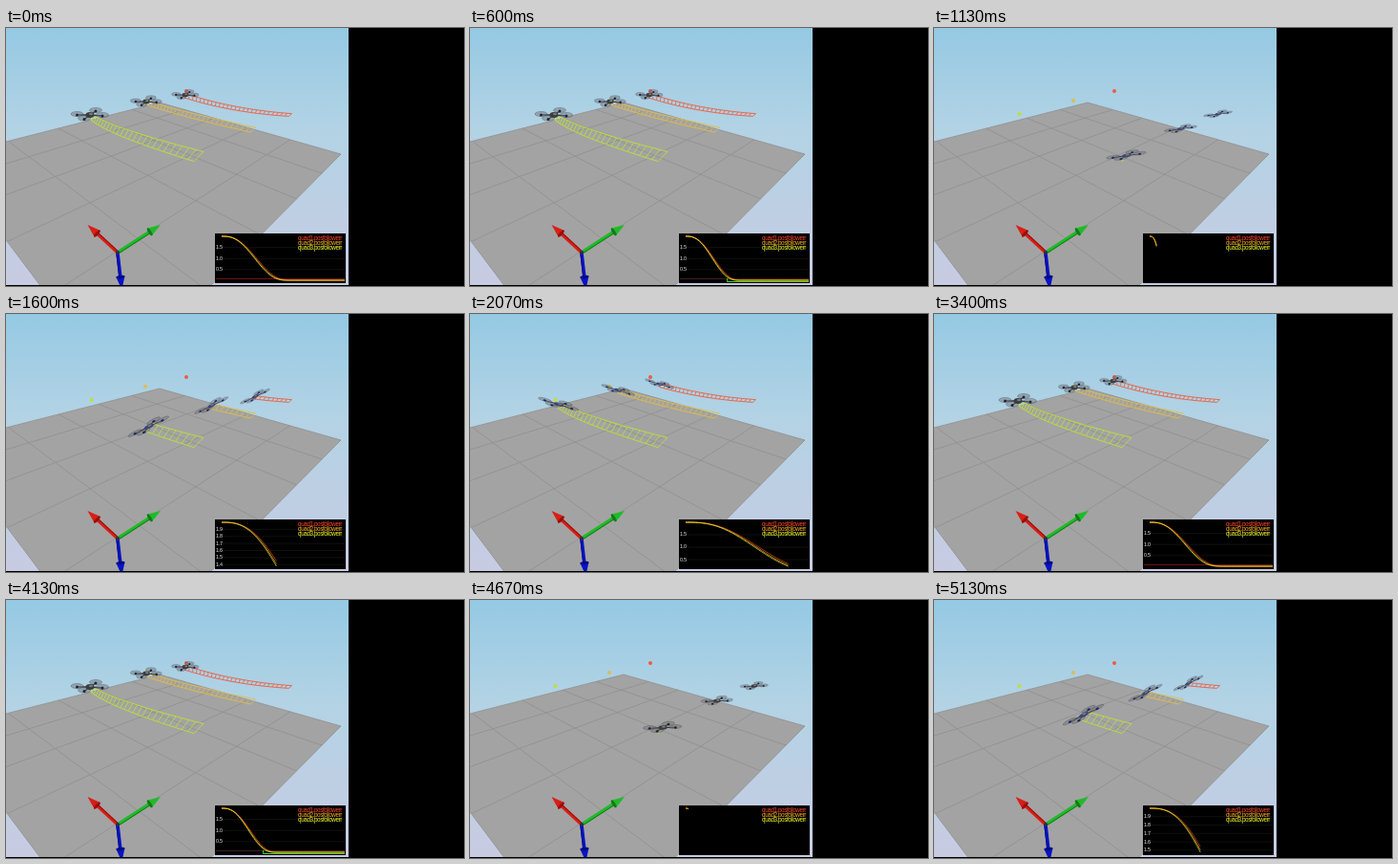
An HTML page with a canvas for the animation above (5.19 s loop, 480 by 270 pixels).

```html
<!DOCTYPE html>
<html>
<head>
<meta charset="utf-8">
<style>
html, body { margin: 0; width: 100%; height: 100%; overflow: hidden; background: #000; }
canvas { display: block; }
</style>
</head>
<body>
<canvas id="stage" width="480" height="270"></canvas>
<script>
const ctx = document.getElementById('stage').getContext('2d');
const LOOP = 5190, STEP = 200 / 3;      // playback length and frame step, ms
const FLIGHT = 3573, OFFSET = 2507;     // one flight cycle and its phase at time 0
const MOVE = 1340, WINDOW = 1200;       // travel time, smallest plot window

// path: start, control, end; half: ribbon half-width at start and end
const quads = [
  { path: [[298, 90], [238, 86], [188, 70]], half: [[1.5, -1.4], [.3, -2.3]], size: 14.5,
    dot: [189, 66], trail: '#ef5c3c', line: '#f8482c', lag: 1.06 },
  { path: [[259, 105.5], [184, 89.5], [147, 77]], half: [[2.5, -2.6], [.6, -2]], size: 16.5,
    dot: [146, 76], trail: '#dfbd4c', line: '#ffae20', lag: 1.025 },
  { path: [[202, 133.5], [107, 107], [88, 91]], half: [[5, -5.2], [1, -2.5]], size: 20,
    dot: [89.5, 90], trail: '#bfdf38', line: '#f0ff30', lag: 1 }
];
const tilts = [[0, 0], [200, -27], [560, -27], [760, 0], [950, 18], [1250, 6], [1530, -5], [1900, 0]];

const mix = (a, b, k) => a + (b - a) * k;

function ease(p) {
  p = Math.min(1, Math.max(0, p));
  return p * p * p * (10 - 15 * p + 6 * p * p);
}

function tiltAt(u) {
  const i = tilts.findIndex(k => k[0] > u);
  if (i < 1) return 0;
  const [a, x] = tilts[i - 1], [b, y] = tilts[i];
  return mix(x, y, (u - a) / (b - a));
}

function along(path, e) {
  return [0, 1].map(i => mix(mix(path[0][i], path[1][i], e), mix(path[1][i], path[2][i], e), e));
}

function poly(points, fill) {
  ctx.beginPath();
  points.forEach(p => ctx.lineTo(p[0], p[1]));
  ctx.closePath();
  ctx.fillStyle = fill;
  ctx.fill();
}

function stroke(points, color, width) {
  ctx.beginPath();
  points.forEach(p => ctx.lineTo(p[0], p[1]));
  ctx.strokeStyle = color;
  ctx.lineWidth = width;
  ctx.stroke();
}

function ellipse(x, y, rx, ry, fill, edge) {
  ctx.beginPath();
  ctx.ellipse(x, y, rx, ry, 0, 0, 7);
  ctx.fillStyle = fill;
  ctx.fill();
  if (edge) {
    ctx.strokeStyle = edge;
    ctx.lineWidth = .7;
    ctx.stroke();
  }
}

// perspective map of the unit square onto corners a, b, c, d
function projector([a, b, c, d]) {
  const sx = a[0] - b[0] + c[0] - d[0], sy = a[1] - b[1] + c[1] - d[1];
  const x1 = b[0] - c[0], y1 = b[1] - c[1], x2 = d[0] - c[0], y2 = d[1] - c[1];
  const det = x1 * y2 - x2 * y1;
  const g = (sx * y2 - x2 * sy) / det, h = (x1 * sy - sx * y1) / det;
  return (u, v) => [0, 1].map(i =>
    ((b[i] - a[i] + g * b[i]) * u + (d[i] - a[i] + h * d[i]) * v + a[i]) / (g * u + h * v + 1));
}

function drawWorld() {
  const sky = ctx.createLinearGradient(0, 0, 0, 270);
  sky.addColorStop(0, '#95c9e3');
  sky.addColorStop(.4, '#b3d3e5');
  sky.addColorStop(1, '#c8cbe2');
  ctx.fillStyle = sky;
  ctx.fillRect(0, 0, 360, 270);

  const corners = [[161, 78], [351, 132], [113, 372], [-65, 135.5]];
  const at = projector(corners);
  poly(corners, '#a3a3a3');
  for (let i = 0; i <= 5; i++) {
    const k = i / 5;
    stroke([at(k, 0), at(k, 1)], '#909090', .8);
    stroke([at(0, k), at(1, k)], '#909090', .8);
  }
}

function arrow(x, y, color, shade) {
  const ox = 117, oy = 235, len = Math.hypot(x - ox, y - oy);
  ctx.save();
  ctx.translate(ox, oy);
  ctx.rotate(Math.atan2(y - oy, x - ox));
  stroke([[0, 0], [len - 13, 0]], color, 3.4);
  stroke([[0, 1.3], [len - 13, 1.3]], shade, 1);
  poly([[len - 14, -4.6], [len, 0], [len - 14, 4.6]], color);
  ellipse(len - 13.5, 0, 1.6, 4.6, shade);
  ctx.restore();
}

function drawTrail(q, e) {
  const top = [], low = [], count = Math.floor(e * 26);
  for (let i = 0; i <= count + 1; i++) {
    const k = Math.min(i / 26, e), [x, y] = along(q.path, k);
    const wx = mix(q.half[0][0], q.half[1][0], Math.sqrt(k));
    const wy = mix(q.half[0][1], q.half[1][1], k);
    top.push([x + wx, y + 1 + wy]);
    low.push([x - wx, y + 1 - wy]);
    stroke([top[i], low[i]], q.trail, .8);
  }
  stroke(top, q.trail, .9);
  stroke(low, q.trail, .9);
}

function drawQuad(q, e, tilt) {
  const [x, y] = along(q.path, e), lean = Math.abs(tilt) / 27;
  const s = q.size / 20 * (1 + .2 * lean);
  const flat = 1 - .45 * Math.min(1, lean * 4);
  ctx.save();
  ctx.translate(x, y);
  ctx.rotate(tilt * Math.PI / 180);
  ctx.scale(s, s * flat);
  const rotors = [[6, -4], [-13.5, 0], [13, 1], [-6, 4.5]];
  rotors.forEach(([rx, ry]) => {
    stroke([[0, 0], [rx, ry]], '#33353d', 1.5);
    ellipse(rx, ry - 1, 6.5, 2.6, 'rgba(115,118,126,.5)', 'rgba(70,72,80,.5)');
    ellipse(rx, ry, 1.5, 1.6, lean > .3 ? '#1d2760' : '#24262e');
  });
  ellipse(0, 0, 4.5, 3, lean > .3 ? '#3c4675' : '#3a3c40');
  ellipse(1, -1, 2, 1.3, '#777b88');
  ctx.restore();
}

function drawPlot(u) {
  const left = 226, width = 129, top = 218, height = 46, max = 2;
  const range = Math.max(WINDOW, u);
  const value = (time, q) => .02 + 1.98 * (1 - ease(time / MOVE / q.lag));
  const min = Math.min(1.99, value(u, quads[2]));
  const py = v => top + (max - v) / (max - min) * height;

  ctx.save();
  ctx.beginPath();
  ctx.rect(219, 215, 137, 52);
  ctx.clip();
  ctx.fillStyle = '#000';
  ctx.fillRect(219, 215, 137, 52);

  ctx.font = '5.4px "Liberation Sans", Arial, sans-serif';
  ctx.textBaseline = 'middle';
  ctx.textAlign = 'left';
  ctx.letterSpacing = '-.3px';
  const span = max - min, tick = span > 1.2 ? .5 : span > .7 ? .2 : .1;
  for (let i = Math.floor(1.9 / tick + .01); i * tick > min; i--) {
    const y = py(i * tick);
    stroke([[left, y], [355, y]], '#1c1c1c', .6);
    ctx.fillStyle = '#eee';
    ctx.fillText((i * tick).toFixed(1), 220, y);
  }
  if (min < .08) stroke([[220, 262.4], [355, 262.4]], u > 2800 ? '#5a2a28' : '#951d18', .8);

  quads.forEach(q => {
    const points = [];
    for (let i = 0; i <= 80; i++) {
      const time = u * i / 80;
      points.push([left + time / range * width, py(value(time, q))]);
    }
    stroke(points, q.line, .7);
  });
  if (u > 2800) stroke([[269.5, 262], [269.5, 265.5], [355, 265.5]], '#35d82c', 1);

  ctx.textAlign = 'right';
  ctx.font = '6.4px "Liberation Sans", Arial, sans-serif';
  ctx.letterSpacing = '-.45px';
  quads.forEach((q, i) => {
    ctx.fillStyle = q.line;
    ctx.fillText(`quad${i + 1}.posfollowerr`, 352, 219.8 + i * 5.1);
  });
  ctx.restore();
}

function draw(now) {
  const t = Math.floor((now % LOOP + 4) / STEP) * STEP;
  const u = (t + OFFSET) % FLIGHT;
  const e = ease(u / MOVE), tilt = tiltAt(u);

  ctx.fillStyle = '#000';
  ctx.fillRect(0, 0, 480, 270);
  ctx.save();
  ctx.beginPath();
  ctx.rect(0, 0, 359, 269);
  ctx.clip();
  drawWorld();
  quads.forEach(q => {
    drawTrail(q, e);
    ellipse(...q.dot, 2, 2, q.trail);
    drawQuad(q, e, tilt);
  });
  arrow(121.5, 274, '#0712c8', '#040a86');
  arrow(85.5, 206, '#d81e16', '#94100c');
  arrow(162, 206, '#1fbb28', '#117a18');
  ellipse(117, 235, 2, 2, '#2a2a55');
  drawPlot(u);
  ctx.restore();
}

let start;
function tick(now) {
  start ??= now;
  draw(now - start);
  requestAnimationFrame(tick);
}
requestAnimationFrame(tick);
</script>
</body>
</html>
```
